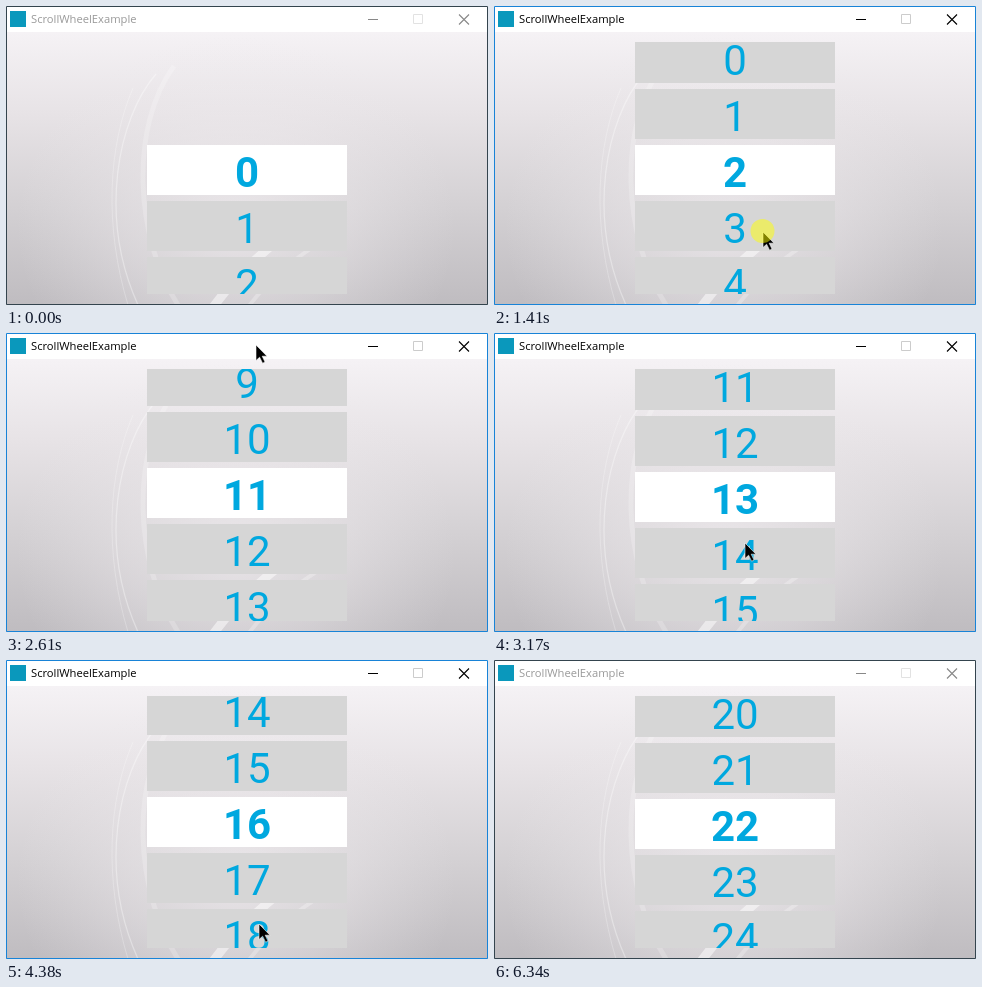
An HTML page with a canvas that plays this animation: 482 by 299 pixels, repeating every 6.44 s.

```html
<!DOCTYPE html>
<html lang="en">
<head>
<meta charset="utf-8">
<title>ScrollWheelExample</title>
<style>
html, body { margin: 0; width: 100%; height: 100%; overflow: hidden; background: #fff; }
canvas { display: block; }
</style>
</head>
<body>
<canvas id="stage" width="482" height="299"></canvas>
<script>
const W = 482, H = 299, LOOP = 6440, PITCH = 56;
const ctx = document.getElementById('stage').getContext('2d');

// [time, x, y] of the pointer tip
const pointer = [
  [160, 300, 292], [400, 276, 265], [620, 268, 256], [720, 267, 215], [900, 262, 150],
  [1000, 261, 146], [1340, 269, 226], [1410, 269, 226], [1520, 266, 170], [1680, 260, 75],
  [1770, 259, 70], [2160, 265, 238], [2260, 265, 238], [2380, 257, 140], [2510, 252, 16],
  [2620, 250, 12], [2740, 250, 16], [2890, 250, 60], [3160, 251, 210], [3380, 252, 250],
  [3460, 252, 250], [3590, 250, 175], [3760, 248, 92], [3860, 248, 88], [4220, 253, 254],
  [4360, 253, 264], [4500, 253, 264], [4640, 250, 190], [4810, 248, 52], [4910, 247, 10],
  [4960, 247, 7], [5080, 247, 7], [5300, 308, 130], [5510, 377, 272], [5710, 381, 292]
];
// [time, item at the centre]
const wheel = [
  [620, 0], [720, 0.73], [900, 1.89], [1150, 2], [1410, 2], [1520, 3], [1680, 4.7], [1900, 5],
  [2260, 5], [2380, 6.75], [2510, 9], [2640, 11.5], [2840, 12.9], [3000, 13], [3460, 13],
  [3590, 14.34], [3760, 15.82], [3900, 16.2], [4150, 16.12], [4360, 16.036], [4440, 16],
  [4500, 16], [4640, 17.32], [4810, 19.8], [4910, 21.3], [5000, 22.1], [5060, 22.07], [5260, 22]
];
const presses = [[600, 900], [1370, 1690], [2210, 2520], [3460, 3770], [4500, 4860]];
const ACTIVE_FROM = 600, ACTIVE_TO = 6340;

// Monotone cubic through the keys: smooth, without overshoot
function sample(keys, t, col) {
  const last = keys.length - 1;
  if (t <= keys[0][0]) return keys[0][col];
  if (t >= keys[last][0]) return keys[last][col];
  const i = keys.findIndex(k => k[0] > t) - 1;
  const slope = j => j < 0 || j >= last ? 0
    : (keys[j + 1][col] - keys[j][col]) / (keys[j + 1][0] - keys[j][0]);
  const tangent = j => {
    const a = slope(j - 1), b = slope(j);
    return a * b <= 0 ? 0 : 2 * a * b / (a + b);
  };
  const span = keys[i + 1][0] - keys[i][0], u = (t - keys[i][0]) / span, v = 1 - u;
  return keys[i][col] * v * v * (1 + 2 * u) + keys[i + 1][col] * u * u * (3 - 2 * u)
    + span * u * v * (tangent(i) * v - tangent(i + 1) * u);
}

function rect(color, x, y, w, h) {
  ctx.fillStyle = color;
  ctx.fillRect(x, y, w, h);
}

function stroke(color, width, path) {
  ctx.strokeStyle = color;
  ctx.lineWidth = width;
  ctx.stroke(new Path2D(path));
}

function fade(gradient, stops) {
  stops.forEach(([at, color]) => gradient.addColorStop(at, color));
  return gradient;
}

const backdrop = fade(ctx.createLinearGradient(0, 26, 0, H),
  [[0, '#f5f2f5'], [0.3, '#e7e3e6'], [0.65, '#d3d0d3'], [1, '#bfbcc0']]);
const glow = fade(ctx.createRadialGradient(0, 0, 0, 0, 0, 1),
  [[0, 'rgba(245,241,244,.65)'], [0.5, 'rgba(240,236,239,.38)'], [1, 'rgba(235,232,235,0)']]);

function drawBackground() {
  rect(backdrop, 0, 26, W, H - 26);
  ctx.save();
  ctx.beginPath();
  ctx.rect(0, 26, W, H - 26);
  ctx.clip();
  ctx.save();
  ctx.translate(230, 220);
  ctx.scale(220, 190);
  rect(glow, -1, -1, 2, 2);
  ctx.restore();
  stroke('rgba(255,255,255,.35)', 1.3, 'M150 68C112 112 92 210 132 299');
  stroke('rgba(255,255,255,.25)', 1, 'M127 82C102 140 98 220 122 299');
  stroke('rgba(255,255,255,.2)', 5, 'M168 60C124 120 128 230 172 299');
  stroke('rgba(255,255,255,.5)', 9, 'M300 215Q244 250 205 304');
  stroke('rgba(255,255,255,.25)', 4, 'M340 222Q275 255 240 304');
  ctx.restore();
}

function drawWheel(position) {
  ctx.save();
  ctx.beginPath();
  ctx.rect(141, 36, 200, 252);
  ctx.clip();
  ctx.textAlign = 'center';
  const selected = Math.round(position);
  for (let i = Math.max(0, selected - 3); i <= selected + 3; i++) {
    const top = Math.round(139 + PITCH * (i - position));
    const current = i === selected;
    rect(current ? '#fff' : '#d6d6d6', 141, top, 200, 50);
    ctx.font = `${current ? 700 : 400} 42px Roboto, sans-serif`;
    ctx.fillStyle = '#00a8df';
    ctx.fillText(i, 241, top + 42);
  }
  ctx.restore();
}

function drawFrame(active) {
  rect('#fff', 0, 0, W, 26);
  rect('#0a98bc', 4, 5, 16, 16);
  ctx.textAlign = 'left';
  ctx.font = '11.2px "Open Sans", sans-serif';
  ctx.fillStyle = active ? '#000' : '#999';
  ctx.fillText('ScrollWheelExample', 25, 17);
  const ink = active ? '#000' : '#888';
  stroke(ink, 1, 'M362 13.5H372');
  stroke(active ? '#ccc' : '#e2e2e2', 1, 'M407.5 8.5h9v9h-9z');
  stroke(ink, 1.1, 'M453 8.5l10 10M463 8.5l-10 10');
  stroke(active ? '#1883d7' : '#34444e', 1, `M.5 .5H${W - 0.5}V${H - 0.5}H.5z`);
}

const arrow = new Path2D('M0 0V15.5L3.6 12.2 6.6 18.2 9 17 6.2 11.2H11z');

function drawPointer(x, y, pressed) {
  ctx.save();
  ctx.translate(Math.round(x), Math.round(y));
  ctx.fillStyle = '#000';
  ctx.fill(arrow);
  ctx.strokeStyle = 'rgba(255,255,255,.8)';
  ctx.lineWidth = 0.7;
  ctx.stroke(arrow);
  if (pressed) {
    ctx.fillStyle = 'rgba(255,255,0,.5)';
    ctx.beginPath();
    ctx.arc(-0.5, -1, 12, 0, 2 * Math.PI);
    ctx.fill();
  }
  ctx.restore();
}

function draw(now) {
  const time = now % LOOP;
  const t = 10 + 50 * Math.floor((time - 10) / 50); // motion advances in 50 ms steps
  drawBackground();
  drawWheel(sample(wheel, t, 1));
  drawFrame(time >= ACTIVE_FROM && time < ACTIVE_TO);
  if (time >= 160 && time < 5740) {
    const pressed = presses.some(([from, to]) => t >= from && t < to);
    drawPointer(sample(pointer, t, 1), sample(pointer, t, 2), pressed);
  }
}

const start = performance.now();
function tick() {
  draw(performance.now() - start);
  requestAnimationFrame(tick);
}
tick();
</script>
</body>
</html>
```
